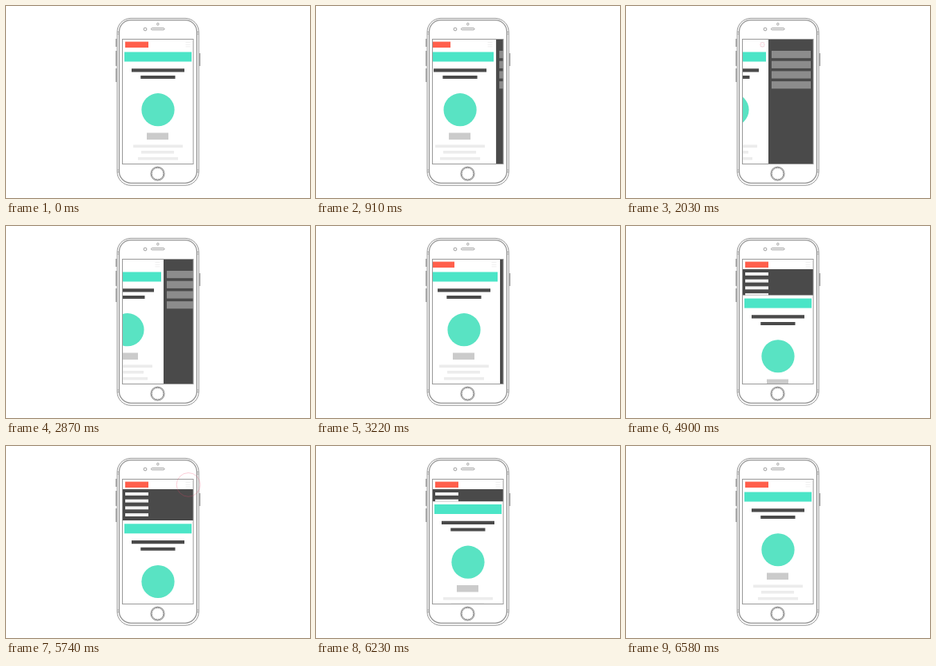
An HTML page for the animation above (6650 ms loop, 380 px wide and 240 px high).

```html
<!DOCTYPE html>
<html lang="en">
<head>
<meta charset="utf-8">
<title>Mobile menu patterns</title>
<style>
  html, body { margin: 0; width: 100%; height: 100%; overflow: hidden; background: #fff; }
  svg { display: block; width: 100%; height: 100%; }
</style>
</head>
<body>
<svg viewBox="0 0 380 240">
  <defs>
    <clipPath id="screenClip"><rect x="146" y="42" width="88" height="155"/></clipPath>
    <clipPath id="menuClip"><rect id="menuWindow" x="146" y="54" width="88" height="0"/></clipPath>
  </defs>

  <g fill="#fff" stroke="#969696">
    <path d="M137.8 41V51M137.8 56V75M137.8 78V95M242.2 59V75" stroke-width="1.4"/>
    <rect x="139" y="15.4" width="102" height="208.8" rx="17"/>
    <rect x="141.5" y="17.6" width="97" height="203.7" rx="14.5" stroke-width="1.3"/>
    <path d="M139 32.5h2M139 35h2M239 32.5h2M239 35h2M139 205h2M139 207.5h2M239 205h2M239 207.5h2" stroke-width=".8"/>
    <circle cx="189.8" cy="22.6" r="1.3" stroke-width=".9"/>
    <circle cx="174" cy="29" r="1.9" stroke-width=".9"/>
    <rect x="181.5" y="27.6" width="16.5" height="2.2" rx="1.1" stroke-width=".9"/>
    <circle cx="189.5" cy="209.6" r="8.5" stroke-width="1.2"/>
    <circle cx="189.5" cy="209.6" r="7.3"/>
  </g>

  <g clip-path="url(#screenClip)">
    <g id="page">
      <rect x="149" y="44.6" width="29" height="7.4" fill="#ff5f4c"/>
      <path d="M224.5 45.5h6M224.5 48.2h6M224.5 50.8h6" stroke="#ececec" stroke-width=".8"/>
      <g id="content">
        <rect x="148" y="57.5" width="84" height="12" fill="#4be5c7"/>
        <path d="M157 78.3h66v4.1h-66zM168.3 87h43.2v4h-43.2z" fill="#4a4a4a"/>
        <circle cx="190" cy="129.7" r="20.6" fill="#59e3c3"/>
        <rect x="176" y="158.5" width="27" height="8.5" fill="#cbcbcb"/>
        <path d="M159 173.5h62v3.5h-62zM169 181h41v3.5h-41zM165 189h50v3.5h-50z" fill="#ececec"/>
      </g>
      <rect x="235" y="42" width="57" height="155" fill="#4a4a4a"/>
      <g id="drawerItems" fill="#8c8c8c"></g>
    </g>
    <g clip-path="url(#menuClip)">
      <rect x="146" y="54" width="88" height="39" fill="#4a4a4a"/>
      <g id="menuItems" fill="#f2f2f2"></g>
    </g>
  </g>

  <rect x="145.5" y="41.5" width="88.6" height="156" fill="none" stroke="#9a9a9a"/>
  <circle id="ripple" cy="48.4" fill="none" stroke="#f4466a"/>
</svg>
<script>
const LOOP = 6650, TICK = 70;
const MOVE = 645, TAP = 655;
const DRAWER = 57, MENU = 39;
const $ = id => document.getElementById(id);
const clamp = v => Math.min(1, Math.max(0, v));

const taps = [
  { at: 70, x: 228 },
  { at: 1960, x: 170.5 },
  { at: 3710, x: 228 },
  { at: 5180, x: 228 }
];

function addBars(parent, x, y, width, height, step) {
  for (let i = 0; i < 4; i++) {
    const bar = document.createElementNS('http://www.w3.org/2000/svg', 'rect');
    const box = { x, y: y + i * step, width, height };
    for (const key in box) bar.setAttribute(key, box[key]);
    parent.append(bar);
  }
}

// cubic-bezier(0, 0, .58, 1)
function easeOut(t) {
  t = clamp(t);
  let low = 0, high = 1;
  for (let i = 0; i < 20; i++) {
    const s = (low + high) / 2;
    if (s * s * (1.74 - 0.74 * s) < t) low = s; else high = s;
  }
  return high * high * (3 - 2 * high);
}

const toggle = (time, open, close) =>
  easeOut((time - open) / MOVE) - easeOut((time - close) / MOVE);

function render(time) {
  const slide = toggle(time, 840, 2730);
  const drop = toggle(time, 4480, 5950);
  $('page').setAttribute('transform', `translate(${-DRAWER * slide} 0)`);
  $('content').setAttribute('transform', `translate(0 ${(MENU + 0.8) * drop})`);
  $('menuWindow').setAttribute('height', MENU * drop);

  const tap = taps.find(({ at }) => time > at && time < at + TAP);
  const ripple = $('ripple');
  ripple.setAttribute('visibility', tap ? 'visible' : 'hidden');
  if (tap) {
    const p = (time - tap.at) / TAP;
    ripple.setAttribute('cx', tap.x);
    ripple.setAttribute('r', 15.4 * easeOut(p));
    ripple.setAttribute('opacity', 0.6 * Math.sin(Math.PI * p));
  }
}

addBars($('drawerItems'), 239, 56, 49, 9.2, 12.7);
addBars($('menuItems'), 149, 58, 29, 3.9, 8.7);

const start = performance.now();
function frame() {
  const time = (performance.now() - start) % LOOP;
  render(Math.floor(time / TICK) * TICK);
  requestAnimationFrame(frame);
}
frame();
</script>
</body>
</html>
```
